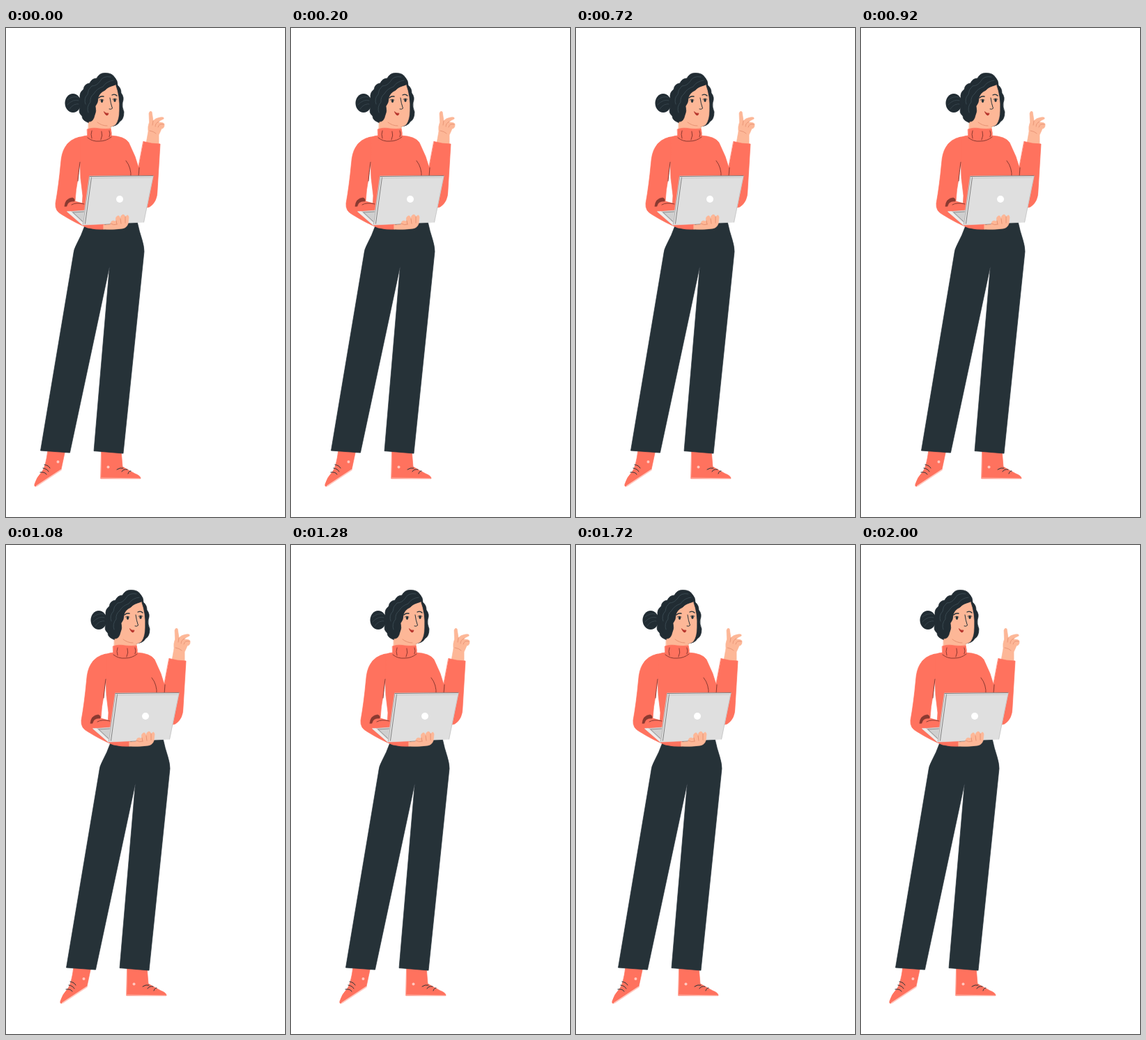
Recreate the animation shown at these times as an HTML page with a canvas. Size 400x700 px, loop 2.04 s.

```html
<!DOCTYPE html>
<html lang="en">
<head>
<meta charset="utf-8">
<title>Woman with laptop</title>
<style>
html, body { margin: 0; width: 100%; height: 100%; overflow: hidden; background: #fff; }
canvas { display: block; }
</style>
</head>
<body>
<canvas id="stage" width="400" height="700"></canvas>
<script>
const ctx = document.getElementById('stage').getContext('2d');
const LOOP = 2040, STEP = 40, HALF = 1000, SHIFT = 40;
const CORAL = '#ff725e', DARK = '#263238', HAIR = '#212c33', SKIN = '#fdb797',
      BROWN = '#8a3a31', ROSE = '#e58f70', PALE = '#ffc7be', STRAND = '#43535c';

function line(color, width, d) {
  ctx.strokeStyle = color;
  ctx.lineWidth = width;
  ctx.stroke(new Path2D(d));
}

// Filled shape with a hairline edge of the same colour
function fill(color, d) {
  ctx.fillStyle = color;
  ctx.fill(new Path2D(d));
  line(color, 0.7, d);
}

function oval(color, x, y, rx, ry = rx) {
  ctx.fillStyle = color;
  ctx.beginPath();
  ctx.ellipse(x, y, rx, ry, 0, 0, Math.PI * 2);
  ctx.fill();
}

function shoes() {
  fill(CORAL, 'M60 604 L85 604 L79 632 L45 655 Q40 658 41 653 Q44 643 51 636 Q57 629 60 604Z');
  line(PALE, 1.6, 'M79 632.5 L44 655.5');
  line(DARK, 1, 'M55 625 Q61 626 63 630 M53 630 Q59 631 61 635 M49 636 Q56 635 58 639');
  oval(PALE, 74.5, 621, 2);

  fill(CORAL, 'M137 604 L165 604 L167 628 Q174 632 185 638 Q193 641 193 645 L136 645Z');
  line(PALE, 0.8, 'M136 644 L192 645');
  line(DARK, 1, 'M159 632 Q163 629 168 630 M166 635 Q168 631 174 632 M175 638 Q176 634 179 634');
  oval(PALE, 146.5, 628.5, 2);
}

function trousers() {
  fill(DARK, 'M113 283 L188 277 Q191 291 195 303 Q198 313 198 320 L168 609 L126 605.5 ' +
    'L148.5 341 L91.5 608 L49.5 605 L96.5 325 Q97 317 101.5 309 Q108 297 113 283Z');
}

function raisedHand() {
  fill(SKIN, 'M201 165 L204 148 Q203 141 205.5 135 L205 122 Q206 118 209 120 L211 133 ' +
    'Q214 129 221 128 Q227 127 226 130 Q221 132 218 135 Q227 135 227 138 ' +
    'Q227 144 223 144 Q221 149 219 153 L219 167Z');
  line(ROSE, 0.8, 'M211 133 L210 139 M219 134 Q214 136 214 141 ' +
    'M226 138 Q219 136 218 142 M206 147 Q212 148 215 151');
}

function torso() {
  fill(CORAL, 'M197 162.5 Q209 166 221 166 Q219 199 217 232 Q217 249 206 256 ' +
    'Q198 260 189 248 L185 225Z');
  fill(CORAL, 'M103 157 Q115 153 126 154 L150 154 Q170 155 176 164 L185 184 L191 203 ' +
    'L190 230 L180 276 L115 278 L109 258 L110 240 L107 215 L106 190Z');
  line(BROWN, 1, 'M172 190 Q180 200 179 214 M191 200 L190 212');
}

function neck() {
  fill(SKIN, 'M119 125 L151 130 L150 148 L118 148Z');
}

function collar() {
  fill(CORAL, 'M116.5 145 Q124 142 134 144 Q143 145 150 144 Q152 150 151 157 ' +
    'Q143 162 133 162 Q122 162 117 157Z');
  line(BROWN, 1, 'M117 157 Q124 163 134 162 Q144 162 151 156 M123 147 Q121 152 123 158 ' +
    'M137 148 Q139 154 136 160 M148 147 Q150 152 148 156');
}

function head() {
  oval(HAIR, 96, 107.5, 11.5, 13.5);
  line(STRAND, 0.6, 'M88 103 Q95 97 103 99 M88 110 Q96 101 105 104 M91 116 Q97 107 106 109');

  // hair behind the face
  fill(HAIR, 'M106 100 Q105 92 111 88 Q112 80 120 79 Q123 72 130 72 Q134 64 142 64.5 ' +
    'Q152 64 156 71 Q160 75 160 82 Q165 86 165 93 Q170 99 167 107 Q166 113 169 120 ' +
    'Q169 131 163 134 Q160 140 150 141 L126 133 Q122 138 117 135 ' +
    'Q109 132 109 126 Q103 121 106 114 Q103 107 106 100Z');

  fill(SKIN, 'M157 82 Q136 88 131 99 Q129 112 125 117 Q122 124 119 131 L119 140 ' +
    'Q128 145 139 142 Q151 143 157 138 Q162 131 162 118 Q163 98 157 82Z');
  line(ROSE, 0.9, 'M131 135 Q137 140 145 140');

  // front lock
  fill(HAIR, 'M159 79 Q147 83 142 89 Q133 93 132 101 Q132 107 128 112 Q130 119 127 125 ' +
    'Q125 135 118 134 L109 120 L112 92 L132 73Z');
  line(STRAND, 0.7, 'M150 70 Q139 68 135 76 Q130 83 123 83 Q117 88 117 95 Q111 101 114 109 ' +
    'M154 75 Q144 76 139 84 Q130 87 126 94 Q120 99 121 106 Q115 113 118 121');

  line(DARK, 1.3, 'M133 100 Q136 97 140 98 M152 96 Q156 94 159 97');
  oval(DARK, 137.5, 104.5, 1.7, 2.4);
  oval(DARK, 156, 103.5, 1.7, 2.4);
  line(DARK, 0.8, 'M134 103 Q137 101 140 103 M153 102 Q156 100 159 102');
  line(DARK, 1, 'M149 100 Q150 108 152.5 115 Q151 117 148 116');
  fill('#b7352d', 'M140.5 120 Q144 123 147 122 Q146.5 125.5 144 125 Q142 124 140.5 120Z');
}

function leftArm() {
  fill(CORAL, 'M106 156 Q91 159 84.5 171 Q79.5 179 78.5 194 Q75.5 226 71 251 Q70 262 80 267 ' +
    'Q101 280 117 286 Q130 289 141 288 L141 262 L113 252 L99 248 Q100 231 103 216 Q105 200 107 180Z');
  line(BROWN, 1, 'M106 192 Q104 207 103 219');
  fill(BROWN, 'M84 255 Q85 244 95 243 Q99 244 98 248 Q89 247 87 255Z');
  line(BROWN, 1, 'M94 253 Q101 249 112 252');
}

function laptop() {
  fill('#cfcfcf', 'M88 263 L114 261 L110 282Z');
  fill('#eeeeee', 'M88 263 L110 282 L112 281 L93 263Z');
  line('#8b8b8b', 0.9, 'M96 264 L113 263 M96 264 L110 277');
  fill('#dfdfdf', 'M120 212 L211 211.5 L197.5 278 L110 282Z');
  line('#a6a6a6', 0.8, 'M120 212.5 L110.5 281');
  line('#777', 0.9, 'M120 212.5 L211 211.5 M122.5 214 L113.5 280');
  line('#c4c4c4', 0.8, 'M123 215 L209 214 M211 212 L197.5 278');
  oval('#fff', 163, 245, 5);
}

function holdingHand() {
  fill(SKIN, 'M140 282 L150 281 Q150 276 154 276 L158 277 Q156 271 160 269 Q163 268 164 274 ' +
    'Q164 268 168 267 Q170 267 171 271 Q175 265 176 271 L175 280 Q173 286 167 287 Q154 289 140 288Z');
  line(ROSE, 0.9, 'M158 276 L159 281 M164 273 L165 280 M171 270 L171 279 M150 280 Q155 283 159 281');
}

const parts = [shoes, trousers, raisedHand, torso, neck, head, collar, leftArm, laptop, holdingHand];

function draw(time) {
  const t = Math.floor((time % LOOP) / STEP) * STEP;
  const x = Math.round(SHIFT * (1 - Math.abs(t - HALF) / HALF));
  ctx.setTransform(1, 0, 0, 1, 0, 0);
  ctx.fillStyle = '#fff';
  ctx.fillRect(0, 0, 400, 700);
  ctx.translate(x, 0);
  ctx.lineCap = ctx.lineJoin = 'round';
  parts.forEach(part => part());
}

const start = performance.now();
function tick() {
  draw(performance.now() - start);
  requestAnimationFrame(tick);
}
tick();
</script>
</body>
</html>
```
